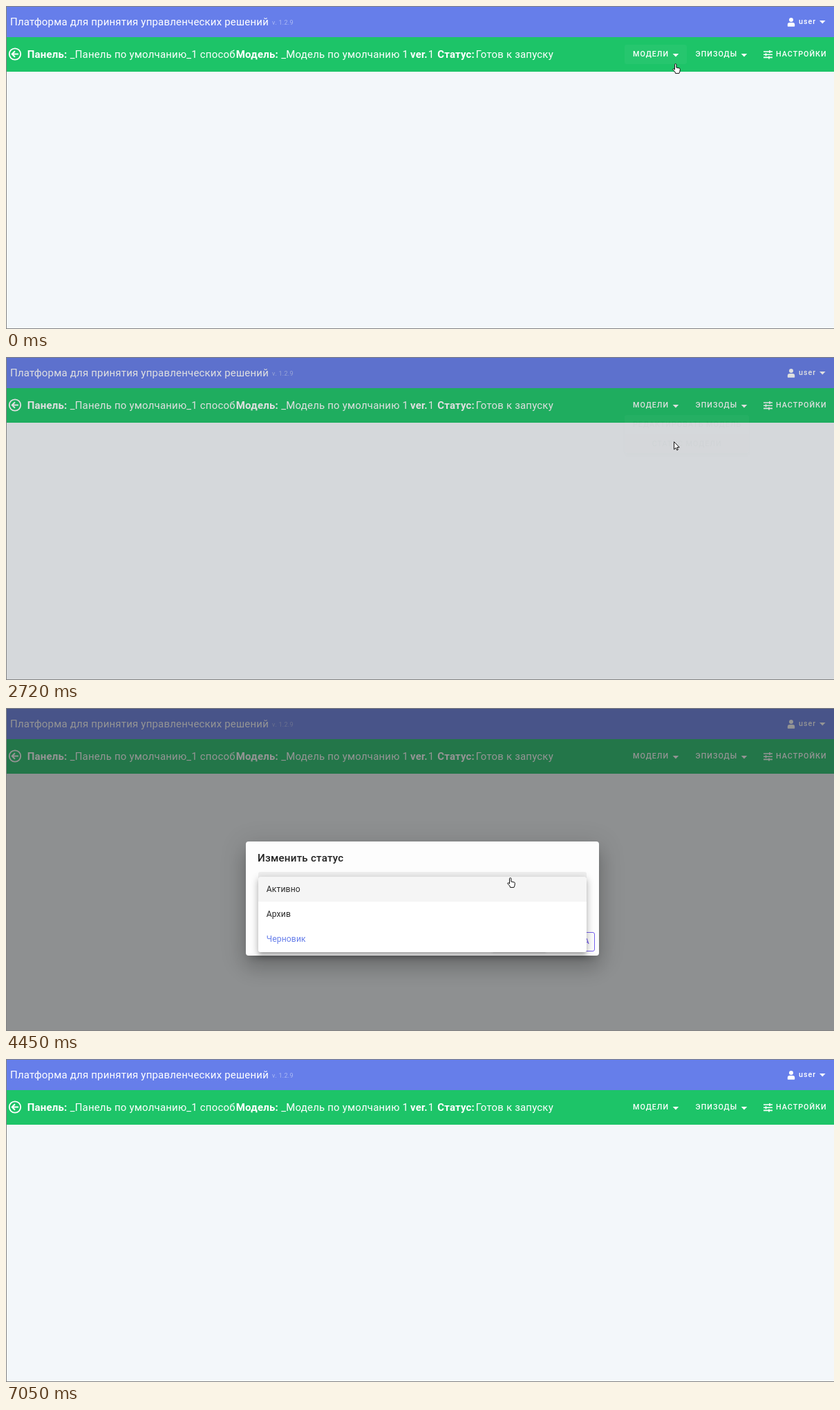
Write an HTML page that moves like this. It is 1198 by 467 pixels and loops after 7300 ms.

```html
<!DOCTYPE html>
<html lang="ru">
<head>
<meta charset="utf-8">
<title>Смена статуса модели</title>
<style>
  html, body { margin: 0; width: 100%; height: 100%; overflow: hidden; }
  body { position: relative; background: #f3f7fa; font: 15px Roboto, sans-serif; color: #fff; }
  body::after { content: ""; position: absolute; inset: 0; border: solid #828282; border-width: 1px 0; border-left-width: 1px; }
  .layer, svg { position: absolute; inset: 0; width: 100%; height: 100%; }
  .box, .text { position: absolute; }
  .text { white-space: pre; line-height: 20px; margin-top: -10px; }
  .head { letter-spacing: .0125em; }
  .btn { font-size: 10.8px; font-weight: 500; letter-spacing: .0893em; }
  .item { font-size: 10.8px; letter-spacing: .0893em; color: #505050; }
  .version { font-size: 9px; letter-spacing: .0333em; opacity: .45; }
  .title { font-size: 15.2px; font-weight: 500; letter-spacing: .0125em; color: #222; }
  .label { font-size: 9.1px; letter-spacing: .009em; }
  .value { font-size: 12.2px; letter-spacing: .009em; color: #2c2c2c; }
  .paper { background: #fff; border-radius: 3px;
    box-shadow: 0 4px 4px -2px #0003, 0 6px 8px 1px #00000024, 0 2px 11px 2px #0000001f; }
  #dialog .sheet { background: #fdfdfd; border-radius: 4px;
    box-shadow: 0 8px 12px -5px #0003, 0 18px 29px 2px #00000024, 0 7px 35px 6px #0000001f; }
  #scrim { background: rgba(42, 42, 42, .5); }
  #dialog { transform-origin: 602px 275px; }
  #menu { transform-origin: 895px 84px; }
  #options { transform-origin: 602px 244px; }
  #field { border-radius: 3px 3px 0 0; }
  #apply { border-radius: 3px; box-shadow: 0 2px 1px -1px #0003, 0 1px 2px #00000024, 0 1px 4px #0000001f; }
  #cancel { border: 1px solid #7762ee; border-radius: 3px; box-sizing: border-box; }
</style>
</head>
<body>
<div id="page" class="layer">
  <svg id="icons" fill="#fff" stroke="none"></svg>
</div>
<div id="menu" class="layer"></div>
<div id="scrim" class="layer"></div>
<div id="dialog" class="layer">
  <div id="form" class="layer"></div>
  <svg><path id="arrow" d="M-5.7-3H5.7L0 3z"/></svg>
  <div id="options" class="layer"></div>
</div>
<svg><path id="cursor" fill="#fff" stroke="#111" stroke-linejoin="round"/></svg>
<script>
const $ = id => document.getElementById(id);

function add(parent, className, left, top, style = {}) {
  const el = $(parent).appendChild(document.createElement('div'));
  el.className = className;
  Object.assign(el.style, { left: left + 'px', top: top + 'px' }, style);
  return el;
}
function text(parent, x, y, string, className, style) {
  const el = add(parent, 'text ' + className, x, y, style);
  el.textContent = string;
  return el;
}
function box(parent, x, y, width, height, background = '', className = '') {
  return add(parent, 'box ' + className, x, y, { width: width + 'px', height: height + 'px', background });
}

// Page bars
box('page', 0, 0, 1198, 45, '#667eea');
box('page', 0, 45, 1198, 50, '#1dc468');
const modelsButton = box('page', 895, 56, 90, 28, '#fff');
modelsButton.style.borderRadius = '3px';
text('page', 6, 23, 'Платформа для принятия управленческих решений', 'head');
text('page', 385, 24, 'v. 1.2.9', 'version');
text('page', 1147, 23, 'user', 'btn');
[[30.8, 'Панель:', 1], [92.7, '_Панель по умолчанию_1 способ'], [332.8, 'Модель:', 1],
 [398.3, '_Модель по умолчанию 1'], [585, 'ver.', 1], [610.8, '1'],
 [624.2, 'Статус:', 1], [679.7, 'Готов к запуску']].forEach(([x, string, bold]) =>
  text('page', x, 70, string, 'head', { fontWeight: bold ? 700 : 400 }));
text('page', 907, 70, 'МОДЕЛИ', 'btn');
text('page', 997.5, 70, 'ЭПИЗОДЫ', 'btn');
text('page', 1114, 70, 'НАСТРОЙКИ', 'btn');
$('page').append($('icons'));
const caret = (x, y) => `<path d="M${x - 4.3} ${y - 2}h8.6l-4.3 4.5z"/>`;
$('icons').innerHTML = caret(969, 71) + caret(1068, 71) + caret(1181.3, 23) + `
  <circle cx="1136" cy="20" r="3"/>
  <path d="M1130.8 29v-2q0-3 3-3h4.4q3 0 3 3v2q0 .8-.8.8h-8.8q-.8 0-.8-.8z"/>
  <g fill="none" stroke="#fff" stroke-width="1.6">
    <circle cx="13" cy="69.5" r="8.2" stroke-width="1.8"/>
    <path d="M18 69.5H9M13 65.2l-4.3 4.3 4.3 4.3" stroke-width="2"/>
    <path d="M1096 66h13M1096 70.2h13M1096 74.4h13M1105 64v4M1099.500 68.200v4M1104 72.400v4"/>
  </g>`;

// Models menu
box('menu', 895, 84, 180, 54.5, '', 'paper');
const statusItem = box('menu', 895, 111, 180, 27.5, '#000');
text('menu', 907, 98, 'РЕДАКТИРОВАТЬ МОДЕЛЬ', 'item');
text('menu', 934.700, 125.500, 'СТАТУС МОДЕЛИ', 'item');

// Status dialog
box('form', 347, 193, 511, 164.5, '', 'sheet');
text('form', 364, 217, 'Изменить статус', 'title');
const field = box('form', 365, 237, 474.5, 44);
field.id = 'field';
const underline = box('form', 365, 280, 474.5, 1);
const focusLine = box('form', 365, 279.500, 474.5, 1.700, '#667eea');
const label = text('form', 373.5, 252, '', 'label');
const value = text('form', 373.2, 266, '', 'value');
const apply = box('form', 703, 324, 78.5, 27.5);
apply.id = 'apply';
const applyText = text('form', 709.3, 338, 'ИЗМЕНИТЬ', 'btn');
box('form', 787.5, 324, 64, 27.5).id = 'cancel';
text('form', 794.7, 338, 'ОТМЕНА', 'btn', { color: '#7762ee' });

// Select options
box('options', 365, 244, 475, 109, '', 'paper');
const activeItem = box('options', 365, 244, 475, 36, '#000');
const optionTexts = ['Активно', 'Архив', 'Черновик'].map((name, i) =>
  text('options', 376.7, 262 + 36 * i, name, 'value'));

const LOOP = 7300;
// Moments at which the screen is refreshed
const TICKS = [0, 870, 990, 1140, 1270, 1540, 1690, 1820, 1940, 2080, 2200, 2350, 2480, 2600, 2720,
  2860, 3000, 3120, 3250, 3390, 3510, 3630, 3780, 3910, 4060, 4180, 4300, 4450, 4720, 4840, 4990,
  5120, 5270, 5420, 5570, 5870, 5990, 6140, 6260, 6410, 6530, 6650, 6780, 6900, 7050];
// Pointer path: time, left, top
const PATH = [[0, 964, 83], [750, 964, 83], [1270, 964, 75], [1940, 964, 75], [2200, 964, 123],
  [2600, 966, 122], [2860, 966, 122], [3250, 826, 184], [3630, 781, 266], [3910, 781, 266],
  [4300, 729, 247], [4450, 725, 245], [5120, 725, 245], [5270, 734, 306], [5420, 730, 327],
  [5570, 730, 335], [5990, 730, 335], [6260, 795, 404], [6410, 795, 404], [6900, 772, 303],
  [LOOP, 772, 303]];
const HAND = 'M3.5 9V1.8a1.2 1.2 0 0 1 2.4 0V6l4.2.9a1.6 1.6 0 0 1 1.300 1.600l-.5 3.500-1 2.400H4.600L3.800 12 .8 9.200A1 1 0 0 1 2 7.800z';
const ARROW = 'M.6.6v11l2.600-2.300 1.600 3.400 1.600-.7-1.500-3.300 3.300-.2z';

const between = (t, a, b) => t >= a && t < b;
const ramp = (t, a, b) => Math.min(1, Math.max(0, (t - a) / (b - a)));
const pulse = (t, inStart, inEnd, outStart, outEnd) => ramp(t, inStart, inEnd) - ramp(t, outStart, outEnd);
const growth = p => `scale(${1 - .2 * (1 - p) ** 2})`;

function pointer(t) {
  const i = PATH.findIndex(p => p[0] > t);
  const [t0, x0, y0] = PATH[i - 1], [t1, x1, y1] = PATH[i];
  const p = ramp(t, t0, t1);
  return [x0 + (x1 - x0) * p, y0 + (y1 - y0) * p];
}

function render(t) {
  // Models button and its menu
  modelsButton.style.opacity = t < 2080 ? .04 + .31 * pulse(t, 1400, 1640, 1690, 1940) : 0;
  $('menu').style.opacity = pulse(t, 1600, 1700, 2560, 2725);
  $('menu').style.transform = growth(ramp(t, 1580, 1690));
  statusItem.style.opacity = t < 2200 ? 0 : .04 + .1 * pulse(t, 2300, 2450, 2480, 2700);

  // Dialog
  $('scrim').style.opacity = pulse(t, 2675, 2825, 6480, 6630);
  $('dialog').style.opacity = pulse(t, 2800, 2950, 6480, 6560);
  $('dialog').style.transform = growth(ramp(t, 2790, 2980));

  // Select field
  const focused = between(t, 3780, 5870);
  const hovered = between(t, 3510, 4060);
  const open = pulse(t, 3980, 4120, 4850, 5010);
  const chosen = t >= 4840;
  field.style.background = hovered ? '#e0e0e0' : '#efefef';
  underline.style.background = hovered ? '#555' : '#8f8f8f';
  focusLine.style.opacity = focused ? 1 : 0;
  focusLine.style.transform = `scaleX(${ramp(t, 3700, 3900)})`;
  label.textContent = t < 6140 ? 'Статус модели' : 'Статус эпизода';
  label.style.color = focused ? '#667eea' : '#777';
  value.textContent = t >= 5990 ? '' : chosen ? 'Активно' : 'Черновик';
  $('arrow').setAttribute('fill', focused ? '#667eea' : '#666');
  $('arrow').setAttribute('transform', `translate(821.3 259) rotate(${150 * open})`);

  // Options
  $('options').style.opacity = open;
  $('options').style.transform = growth(ramp(t, 3960, 4110));
  activeItem.style.opacity = between(t, 4180, 4990) ? .04 + .08 * pulse(t, 4600, 4720, 4800, 4990) : 0;
  optionTexts.forEach((el, i) => el.style.color = i === (chosen ? 0 : 2) ? '#667eea' : '#2c2c2c');

  // Apply button
  const disabled = t >= 5990;
  apply.style.background = disabled ? '#d9d9d9' : between(t, 5870, 5990) ? '#55d58f' : '#1fc76b';
  applyText.style.color = disabled ? '#a9a9a9' : '#fff';

  // Pointer
  const [x, y] = pointer(t);
  const arrow = between(t, 2600, 3510) || between(t, 5270, 5420) || t >= 6140;
  $('cursor').setAttribute('d', arrow ? ARROW : HAND);
  $('cursor').setAttribute('transform', `translate(${x} ${y})`);
  $('cursor').style.opacity = t < 7050 ? 1 : 0;
}

function loop() {
  const t = performance.now() % LOOP;
  render(TICKS.findLast(tick => tick <= t));
  requestAnimationFrame(loop);
}
loop();
</script>
</body>
</html>
```
